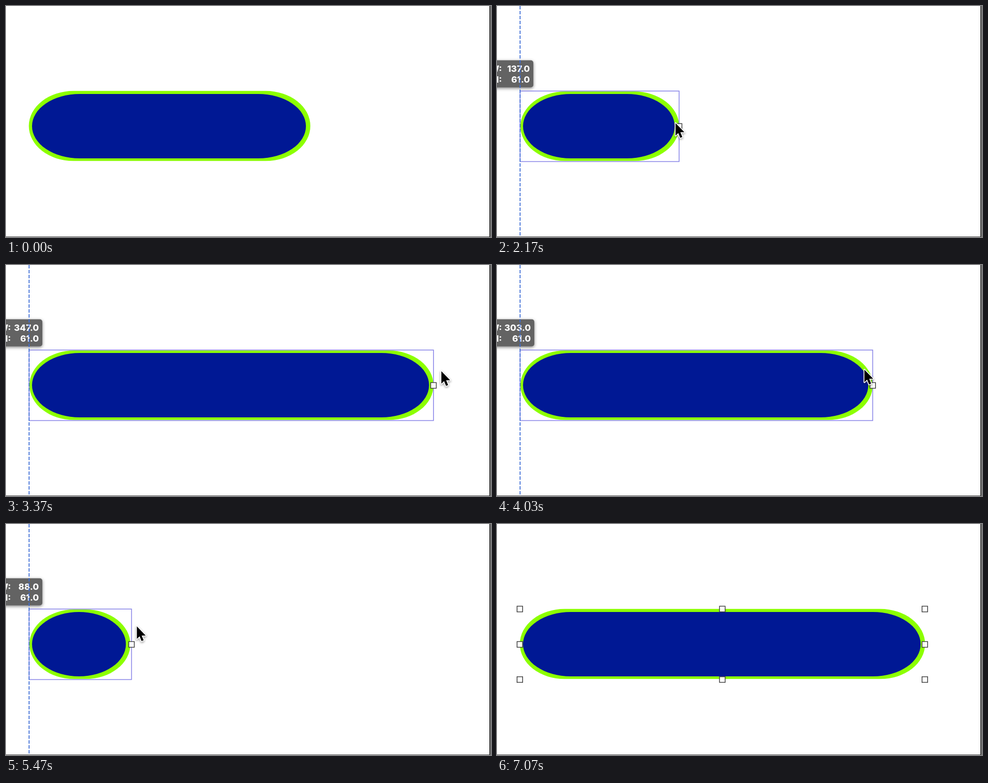
These frames come from a looping animation (988 px wide and 470 px high, 8 s). An HTML page with a canvas:

```html
<!DOCTYPE html>
<html lang="en">
<head>
<meta charset="utf-8">
<title>Resizing a pill</title>
<style>
html, body { margin: 0; width: 100%; height: 100%; overflow: hidden; background: #fff; }
canvas { display: block; }
</style>
</head>
<body>
<canvas id="stage" width="988" height="470"></canvas>
<script>
const ctx = document.getElementById('stage').getContext('2d');
const LOOP = 8000, TICKS = 240;
const LEFT = 47, TOP = 173, MIDDLE = 245, BOTTOM = 316.5;
const SELECT = 18, PRESS = 45, RELEASE = 212;
const LAG = 1.1, GRIP = 4;

// Turning points of the pointer; it eases from one to the next
const turns = [
  { at: 1, x: 968, y: 452 }, { at: SELECT, x: 440, y: 260 },
  { at: 36, x: 624, y: 242 }, { at: PRESS, x: 624, y: 242 },
  { at: 69, x: 345, y: 238 }, { at: 106, x: 912, y: 215 },
  { at: 148, x: 334, y: 208 }, { at: 160, x: 252, y: 208 },
  { at: 203, x: 938, y: 222 }, { at: 211, x: 876, y: 228 }
];

function pointerAt(tick) {
  const next = turns.findIndex(turn => turn.at > tick);
  if (next < 0) return turns[turns.length - 1];
  if (next === 0) return turns[0];
  const a = turns[next - 1], b = turns[next];
  const ease = (1 - Math.cos(Math.PI * (tick - a.at) / (b.at - a.at))) / 2;
  return { x: a.x + (b.x - a.x) * ease, y: a.y + (b.y - a.y) * ease };
}

// The right edge trails the pointer while it is held
const edgeAt = tick => pointerAt(Math.max(PRESS, tick - LAG)).x - GRIP;

function capsule(left, top, right, bottom, cap, color) {
  const rx = Math.min(cap, (right - left) / 2), ry = (bottom - top) / 2, y = top + ry;
  ctx.beginPath();
  ctx.ellipse(left + rx, y, rx, ry, 0, Math.PI / 2, Math.PI * 1.5);
  ctx.ellipse(right - rx, y, rx, ry, 0, -Math.PI / 2, Math.PI / 2);
  ctx.fillStyle = color;
  ctx.fill();
}

function drawPill(right, dragging) {
  capsule(dragging ? 47.8 : 46.5, dragging ? 174 : 172.8, right, 315.3, 91, '#8cff00');
  capsule(53, 179, right - 9, 310, 97, '#001894');
}

function handle(x, y) {
  ctx.fillStyle = 'rgba(255,255,255,.92)';
  ctx.strokeStyle = '#444';
  ctx.lineWidth = 1.6;
  ctx.beginPath();
  ctx.rect(x - 5.7, y - 5.7, 11.4, 11.4);
  ctx.fill();
  ctx.stroke();
}

function drawHandles(right) {
  const center = (LEFT + right) / 2 - 0.5;
  for (const x of [LEFT - 0.5, center, right - 0.5])
    for (const y of [TOP, MIDDLE, BOTTOM])
      if (x !== center || y !== MIDDLE) handle(x, y);
}

function drawBox(right) {
  ctx.strokeStyle = '#8985e8';
  ctx.lineWidth = 1.6;
  ctx.strokeRect(LEFT, TOP, right - LEFT, BOTTOM - TOP);
  handle(right, MIDDLE);
}

function shadow(alpha, blur, dy) {
  ctx.shadowColor = `rgba(0,0,0,${alpha})`;
  ctx.shadowBlur = blur;
  ctx.shadowOffsetY = dy;
}

function drawLabel(right) {
  const width = ((right - LEFT) / 2.373).toFixed(0) + '.0';
  ctx.font = '800 18px Inter, sans-serif';
  ctx.textAlign = 'right';
  const end = Math.max(67, 15 + ctx.measureText(width).width);
  ctx.save();
  shadow(0.5, 6, 2);
  ctx.fillStyle = '#636363';
  ctx.beginPath();
  ctx.roundRect(-20, 110.5, end + 27, 55, 5);
  ctx.fill();
  ctx.restore();
  ctx.fillStyle = '#fff';
  [['W:', width, 134], ['H:', '61.0', 156]].forEach(([name, value, y]) => {
    ctx.fillText(name, 10, y);
    ctx.fillText(value, end, y);
  });
}

function drawGuide() {
  ctx.save();
  ctx.strokeStyle = '#3b6cd6';
  ctx.lineWidth = 1.8;
  ctx.setLineDash([7, 3]);
  ctx.beginPath();
  ctx.moveTo(LEFT, 0);
  ctx.lineTo(LEFT, 468);
  ctx.stroke();
  ctx.restore();
}

const arrow = new Path2D('M0 0V25.5L5.6 20.2L9.6 30L13.8 28.2L9.8 18.6H18Z');
const resizer = new Path2D('M-14.5 0L-7-7V-2H-2V-13.5H2V-2H7V-7L14.5 0L7 7V2H2V13.5H-2V2H-7V7Z');

function drawPointer(shape, { x, y }) {
  ctx.save();
  ctx.translate(x, y);
  ctx.strokeStyle = '#fff';
  ctx.lineWidth = 3.4;
  ctx.lineJoin = 'round';
  shadow(0.4, 4, 2);
  ctx.stroke(shape);
  ctx.shadowColor = 'transparent';
  ctx.fillStyle = '#000';
  ctx.fill(shape);
  ctx.restore();
}

function draw(tick) {
  const right = edgeAt(tick);
  const dragging = tick > PRESS + 1 && tick < RELEASE;
  ctx.fillStyle = '#fff';
  ctx.fillRect(0, 0, 988, 470);
  ctx.fillStyle = '#000';
  ctx.fillRect(985, 0, 2, 470);
  ctx.fillStyle = '#444';
  ctx.fillRect(0, 469, 986, 1);

  // The pill redraws out of step with the box, so it lags on even ticks
  const pillLag = dragging && tick % 2 === 0 ? 0.5 : 0;
  drawPill(tick < PRESS ? edgeAt(PRESS) : edgeAt(tick - pillLag), dragging);
  if (dragging) {
    drawBox(right);
    drawLabel(right);
    drawGuide();
  } else if (tick >= RELEASE || (tick >= SELECT && tick < PRESS)) {
    drawHandles(right);
  }
  if (tick > 0 && tick < RELEASE) {
    const atEdge = tick >= 32 && tick <= PRESS + 1;
    drawPointer(atEdge ? resizer : arrow, pointerAt(tick));
  }
}

function play() {
  const time = performance.now() % LOOP;
  draw(Math.floor((time + 4) * TICKS / LOOP) % TICKS);
  requestAnimationFrame(play);
}
play();
</script>
</body>
</html>
```
